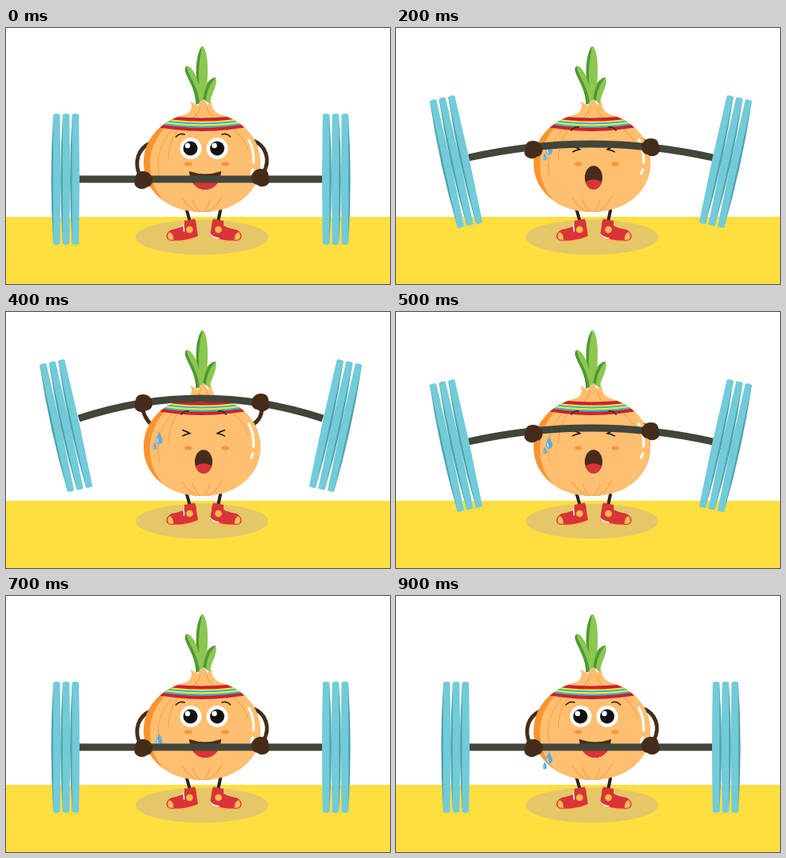
An HTML page for the animation above (1000 ms loop, 480 by 320 pixels).

```html
<!DOCTYPE html>
<html lang="en">
<head>
<meta charset="utf-8">
<title>Onion weightlifter</title>
<style>
html, body { margin: 0; width: 100%; height: 100%; overflow: hidden; background: #fff; }
svg { display: block; width: 100vw; height: 100vh; }
.line { fill: none; stroke-linecap: round; stroke-linejoin: round; }
</style>
</head>
<body>
<svg viewBox="0 0 480 320">
  <defs>
    <path id="skin" d="M231 92 Q236 95 239 98 Q243 92 247 89 Q250 94 252 97 Q254 94 257 92 Q256 103 267 108 C298 116 318 140 318 169 C318 205 286 230 245 230 C204 230 172 205 172 169 C172 140 192 116 225 108 Q235 103 231 92Z"/>
    <clipPath id="inSkin"><use href="#skin"/></clipPath>
    <g id="shoe">
      <path d="M202 266 Q221 272 240 263 L240 258 L202 260Z" fill="#ffbd5c"/>
      <path d="M223 241 L236 238.500 Q238 243 238 247 L240 260 Q221 268 203 265 C198 261 201 255 207 252 Q218 250 223 247Z" fill="#d93438"/>
      <path d="M204 254.500 Q210 256 210 265.500 L204 265 Q199 261 204 254.500Z" fill="#ffbd5c" stroke="#d93438"/>
      <circle cx="229.500" cy="252" r="4.300" fill="#ffb84e"/>
    </g>
    <path id="eye" d="M220.500 146.700 Q227 148.500 232 152 Q226 153 220.500 155.800 L219.700 154.700 Q223 152.500 227.500 151.600 Q224 149.500 220 148.300Z"/>
    <g id="drop">
      <path d="M0 -8.500 C1 -4 4.200 0 4.200 3.500 A4.200 4.200 0 0 1 -4.200 3.500 C-4.200 0 -1 -4 0 -8.500Z" fill="#65a9d8"/>
      <path class="line" d="M-2 1 Q-3 4 -1 5.500" stroke="#c4e4f5" stroke-width="1.500"/>
    </g>
  </defs>

  <rect width="480" height="320" fill="#fff"/>
  <rect y="236" width="480" height="84" fill="#ffde40"/>
  <ellipse cx="245" cy="261.500" rx="83" ry="22" fill="#e4c768"/>

  <path class="line" d="M226 228 L230 242 M268 228 L265 242" stroke="#2b2521" stroke-width="4"/>
  <use href="#shoe"/>
  <use href="#shoe" transform="translate(495) scale(-1 1)"/>
  <path class="line" d="M221.500 247 Q223 250 222.500 254 M255.500 258 Q259 262 266 263" stroke="#fff" stroke-width="1.500"/>

  <path id="arms" class="line" stroke="#452c1a" stroke-width="4.800"/>

  <path d="M237.500 96 C237 76 228 66 224 54 Q223 49 226 47.500 Q230 47.500 233 52.500 Q236 56 238 61 C237 46 239.500 31 243.500 24.500 Q245.500 21 247.500 24.500 C252 32 253 50 251.500 68 C255 64 258.500 62 262 62 Q264 67 261 75 C258 84 255 87 255.500 96 L247 89Z" fill="#8cc751"/>
  <g fill="#4f9836">
    <path d="M245.500 22.500 C239 30 237 46 238 61 L241.500 72 C240 54 242 37 245.500 22.500Z"/>
    <path d="M224 54 Q223 49 226 47.500 C227 59 240 72 242 94 L237.500 96 C237 76 228 66 224 54Z"/>
    <path d="M262 62 C256 62 249 70 246.500 89 L250 91 C251 77 256 69 262 62Z"/>
  </g>

  <use href="#skin" fill="#f8942f"/>
  <g clip-path="url(#inSkin)">
    <path d="M229 88 L260 88 L262 105 L330 130 V235 H222 C195 220 180 199 180 171 C180 148 192 126 214 111 Q236 106 229 88Z" fill="#ffbf70"/>
    <path class="line" d="M207 128 C193 144 187 165 192 188 M214 128 Q203 144 203 164 M243 98 Q241 106 235 112 M251 99 Q253 107 259 112 M285 127 Q299 139 303 154 M233 214 Q236 224 243 230 M255 214 Q253 224 247 230 M270 210 Q264 224 251 230 M220 212 Q226 223 238 229" stroke="#f1a047" stroke-width="1.100"/>
    <g class="line" id="band"></g>
  </g>
  <path class="line" d="M303.500 140 Q310 151 309.500 168 M308.500 177 L306.500 182" stroke="#fff" stroke-width="3.200"/>
  <g fill="#f79436">
    <ellipse cx="228" cy="170" rx="4.700" ry="2.500"/>
    <ellipse cx="274" cy="170" rx="4.700" ry="2.500"/>
  </g>

  <g id="calm">
    <g fill="#fff"><circle cx="231" cy="150.500" r="13.500"/><circle cx="264" cy="150.500" r="13.500"/></g>
    <g fill="#111"><circle cx="230.500" cy="150.500" r="9"/><circle cx="264" cy="150.500" r="9"/></g>
    <g fill="#fff"><circle cx="227" cy="147" r="3.200"/><circle cx="260.500" cy="147" r="3.200"/></g>
    <path class="line" d="M212.500 136 Q217 131 223 133 M270 133 Q276 131 280.500 136" stroke="#472c1a" stroke-width="1.800"/>
    <path d="M229 179 Q249 186 269 179 C268 195 258 202 249 202 C240 202 230 195 229 179Z" fill="#472c1a"/>
    <path d="M231.500 191 Q249 185 266.500 191 Q260 202 249 202 Q238 202 231.500 191Z" fill="#d93438"/>
  </g>
  <g id="strain">
    <use href="#eye" fill="#1d1714"/>
    <use href="#eye" fill="#1d1714" transform="translate(494) scale(-1 1)"/>
    <path class="line" d="M219 128 Q222 123 228 124 M266 124 Q272 123 275 128" stroke="#472c1a" stroke-width="1.800"/>
    <ellipse cx="247" cy="187" rx="11" ry="14.800" fill="#472c1a"/>
    <path d="M237 192.500 Q247 186 257 192.500 Q254 201.800 247 201.800 Q240 201.800 237 192.500Z" fill="#d93438"/>
  </g>

  <g id="sweat">
    <use href="#drop" transform="translate(191.500 150)"/>
    <use href="#drop" transform="translate(186 160) scale(.6)"/>
  </g>

  <path id="bar" fill="none" stroke="#42453a" stroke-width="8.800"/>
  <g id="left"></g>
  <g id="right"></g>
  <g fill="#452c1a">
    <path id="handL" d="M-10 -4 Q-9 -11 -1 -11 Q6 -11 9 -6 Q12 -4 11 2 Q10 8 4 9 Q-1 13 -7 10 Q-13 7 -11 1Z"/>
    <path id="handR" d="M10 -4 Q9 -11 1 -11 Q-6 -11 -9 -6 Q-12 -4 -11 2 Q-10 8 -4 9 Q1 13 7 10 Q13 7 11 1Z"/>
  </g>
</svg>
<script>
const $ = id => document.getElementById(id);
const LOOP = 1000, STEP = 100;

// mid/end: bar heights; plate: height of plate centre; hands: left and right heights
const poses = [
  { mid: 189, end: 189, plate: 189, tilt: 0, hands: [190, 187],
    arms: "M180 144 C165 151 160 167 167 184 M307 140 C325 146 331 164 322 181" },
  { mid: 172, end: 181, plate: 182, tilt: 8, hands: [177, 173],
    arms: "M180 142 C168 147 162 158 167 171 M307 139 C323 143 330 155 324 168" },
  { mid: 145, end: 162, plate: 167, tilt: 12.4, hands: [152, 149],
    arms: "M183 142 L172 150 M307 139 L318 147" },
  { mid: 108, end: 133, plate: 142, tilt: 12.4, hands: [114, 113],
    arms: "M170 119 Q173 133 182 141 M320 119 Q320 134 308 141" }
];
const order = [0, 1, 2, 3, 3, 2, 1, 0, 0, 0];

const RED = "#cc2030", YELLOW = "#ffe533", CYAN = "#2fb9cf";
const stripes = [[YELLOW, 115.2, 2.6], [CYAN, 117.2, 2.4], [YELLOW, 119.2, 2.4],
                 [CYAN, 121.2, 2.4], [RED, 112, 4], [RED, 124.3, 4.2]];
$("band").innerHTML = stripes.map(([color, y, w]) =>
  `<path d="M180 ${y - 4} Q245 ${y + 9} 310 ${y - 4}" stroke="${color}" stroke-width="${w}"/>`).join("");

// Three plates around the origin; a dark rim swells out on the outer (left) side and closes the gaps
$("left").innerHTML = $("right").innerHTML = [-11.8, 0, 11.8].map(x => `<g transform="translate(${x})">
  <path d="M-4 -81 Q-9.600 0 -4 81 L2 81 V-81Z" fill="#55a4ac"/>
  <path d="M-4 -81 Q0 -83 4.300 -81 Q6 0 4.300 81 Q0 83 -4 81 Q-4.200 0 -4 -81Z" fill="#72cbd9"/></g>`).join("");

function draw(ms) {
  const step = Math.floor((ms % LOOP) / STEP);
  const p = poses[order[step]];
  const straining = order[step] > 0;

  $("calm").style.display = straining ? "none" : "";
  $("strain").style.display = straining ? "" : "none";
  $("arms").setAttribute("d", p.arms);
  $("bar").setAttribute("d", `M91 ${p.end} Q243.500 ${2 * p.mid - p.end} 396 ${p.end}`);

  const turn = `rotate(${-p.tilt})`;
  $("left").setAttribute("transform", `translate(75 ${p.plate}) ${turn}`);
  $("right").setAttribute("transform", `translate(412 ${p.plate}) scale(-1 1) ${turn}`);
  $("handL").setAttribute("transform", `translate(172 ${p.hands[0]})`);
  $("handR").setAttribute("transform", `translate(318 ${p.hands[1]})`);

  // Sweat falls with constant acceleration
  $("sweat").style.display = step ? "" : "none";
  $("sweat").setAttribute("transform", `translate(0 ${0.81 * (step - 1) ** 2})`);
}

const start = performance.now();
function tick() {
  draw(performance.now() - start);
  requestAnimationFrame(tick);
}
draw(0);
requestAnimationFrame(tick);
</script>
</body>
</html>
```
